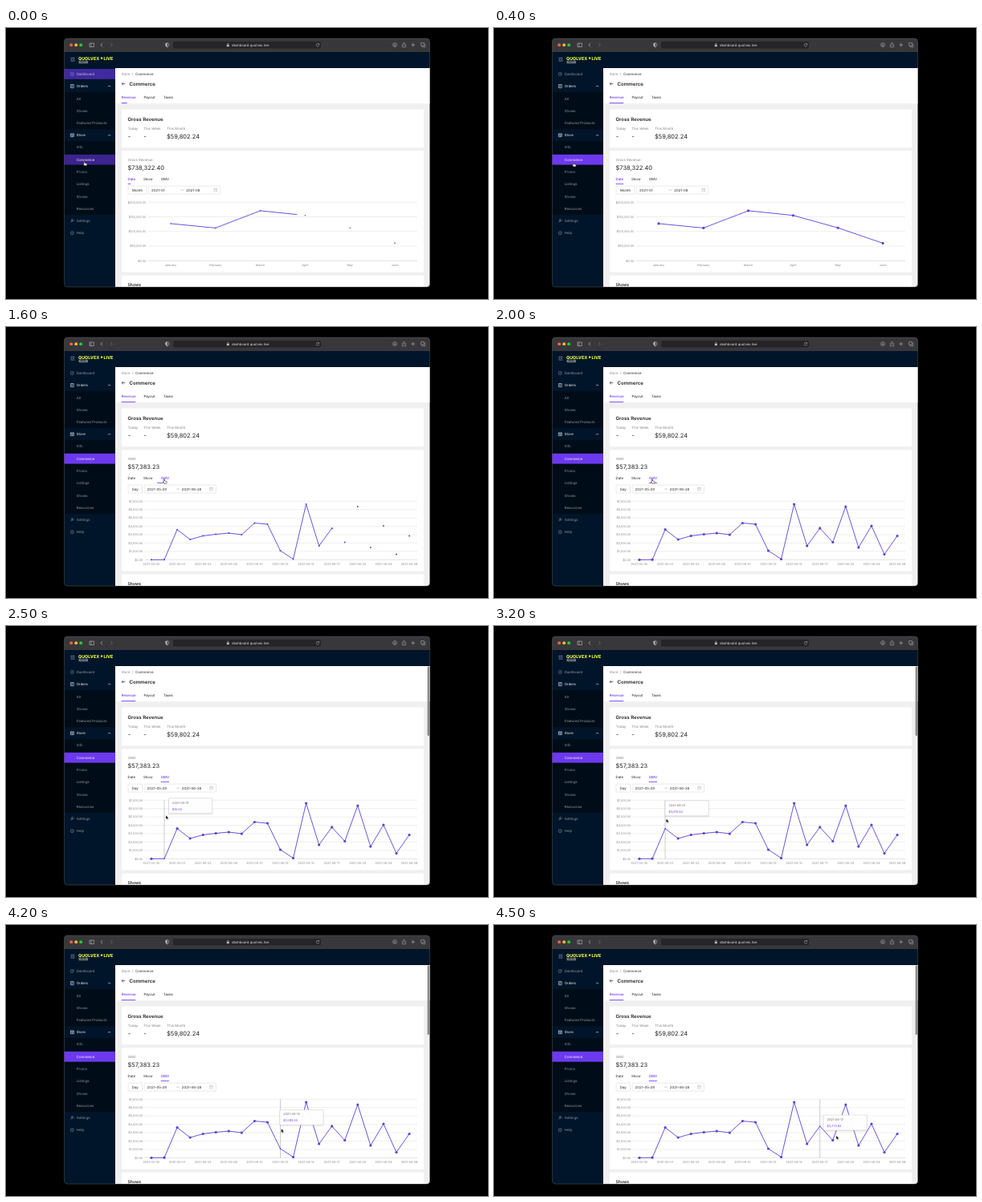
Write an HTML page that moves like this. It is 600 px wide and 338 px high and loops after 4.6 s.

```html
<!DOCTYPE html>
<html lang="en">
<head>
<meta charset="utf-8">
<title>Commerce dashboard</title>
<style>
html, body { margin: 0; width: 100%; height: 100%; overflow: hidden; background: #000; }
svg { display: block; width: 600px; height: 338px; font-family: Inter, Roboto, sans-serif; text-rendering: geometricPrecision; }
</style>
</head>
<body>
<svg viewBox="0 0 600 338">
  <defs>
    <clipPath id="window"><rect x="72.5" y="13" width="455" height="310" rx="4"/></clipPath>
    <clipPath id="plot"><rect x="140" y="200" width="372.5" height="100"/></clipPath>
  </defs>
  <g clip-path="url(#window)"><g id="page"></g><g id="live"></g></g>
  <rect x="72.5" y="13" width="455" height="310" rx="4" fill="none" stroke="#777" stroke-opacity=".6" stroke-width=".6"/>
  <g id="pointer"></g>
</svg>
<script>
const LOOP = 4600, STEP = 100, CLICK = 1400;
const PURPLE = '#6c39ee', LINE = '#5a41d6', INK = '#222', GRAY = '#858585', DIM = '#8f98a1';
const TOP = 217.3, BASE = 290.3;
const $ = id => document.getElementById(id);

const text = (x, y, str, size = 4.35, fill = INK, weight = 400, anchor = 'start') =>
  `<text x="${x}" y="${y + size * .36}" font-size="${size}" fill="${fill}" font-weight="${weight}" text-anchor="${anchor}">${str}</text>`;
const box = (x, y, w, h, fill, extra = '') =>
  `<rect x="${x}" y="${y}" width="${w}" height="${h}" fill="${fill}" ${extra}/>`;
const stroke = (d, color, width = .6, extra = '') =>
  `<path d="${d}" fill="none" stroke="${color}" stroke-width="${width}" ${extra}/>`;
const dot = (x, y, r, fill, extra = '') => `<circle cx="${x}" cy="${y}" r="${r}" fill="${fill}" ${extra}/>`;
const ring = (x, y, r, color) => dot(x, y, r, 'none', `stroke="${color}" stroke-width=".55"`);

const ramp = (t, from, length) => Math.min(1, Math.max(0, (t - from) / length));
const easeOut = p => 1 - (1 - p) ** 2;
const mix = (a, b, p) => a + (b - a) * p;
const money = (v, digits = 2) => '$' + v.toLocaleString('en-US', { minimumFractionDigits: digits, maximumFractionDigits: digits });

// Position on a path of [time, x, y] keys
function along(keys, t) {
  const i = keys.findIndex(k => k[0] > t);
  if (i < 0) return keys.at(-1).slice(1);
  if (i === 0) return keys[0].slice(1);
  const a = keys[i - 1], b = keys[i], p = ramp(t, a[0], b[0] - a[0]);
  return [mix(a[1], b[1], p), mix(a[2], b[2], p)];
}

const cursorPath = [
  [0, 97, 166], [600, 99, 168], [800, 112, 178], [1000, 143.5, 179], [1200, 151, 181],
  [1400, 196.3, 189.5], [2000, 196.3, 189.5], [2100, 188, 222], [2200, 188, 222],
  [2500, 199, 236], [2900, 199, 236], [3200, 214.3, 240.3], [3500, 267, 245], [3700, 267, 245],
  [3900, 290, 247.5], [4300, 360, 256], [4500, 426, 262.5]];
const tipPath = [
  [2100, 188, 203], [2200, 188, 203], [2500, 202.5, 214.8], [2900, 202.5, 214.8], [3200, 213, 217.8],
  [3500, 269, 222], [3700, 269, 222], [3900, 292, 225.6], [4300, 357, 232], [4500, 410, 237]];

const monthly = {
  title: 'Gross Revenue', total: '$738,322.40', unit: 'Month', unitW: 23, range: ['2021-01', '2021-06'],
  gridX: 177, x0: 205, dx: 55.8, max: 200000, tick: 50000, every: 1,
  names: ['January', 'February', 'March', 'April', 'May', 'June'],
  values: [127000, 112000, 171000, 155000, 112500, 60000]
};
const daily = {
  title: 'GMV', total: '$57,383.23', unit: 'Day', unitW: 17.5, range: ['2021-05-29', '2021-06-28'],
  gridX: 173, x0: 181, dx: 16.05, max: 7000, tick: 1000, every: 2,
  names: ('05-30 05-31 06-01 06-02 06-03 06-04 06-08 06-09 06-10 06-11 06-12 06-14 06-15 06-16 06-17 ' +
    '06-21 06-22 06-23 06-24 06-25 06-28').split(' ').map(d => '2021-' + d),
  values: [0, 10, 3613.92, 2425, 2857, 3050, 3190, 2998.76, 4390, 4247, 1083, 77, 6645, 1659,
    3773.82, 2090, 6357, 1467, 4056, 652, 2857]
};

function browserBar() {
  const c = '#b9b9bb';
  return box(72, 13, 456, 17, '#38383b') +
    ['#ff5f57', '#febc2e', '#28c840'].map((f, i) => dot(81.2 + i * 6, 21.2, 1.9, f)).join('') +
    stroke('M104 19h5.5v4.5h-5.5zM106 19v4.5', c) +
    stroke('M120 19l-2 2.2 2 2.2', c, .7) + stroke('M130.3 19l2 2.2-2 2.2', '#77777a', .7) +
    stroke('M200.7 18.6l2 .7v2q0 1.7-2 2.6-2-.9-2-2.6v-2z', c) +
    `<path d="M200.7 18.6v5.3q-2-.9-2-2.6v-2z" fill="${c}"/>` +
    box(208, 17, 184, 8.6, '#252527', 'rx="1.8"') +
    box(274.8, 20.8, 3, 2.4, c) + stroke('M275.4 21v-1q0-1 .9-1t.9 1v1', c, .5) +
    text(281, 21.2, 'dashboard.quolvex.live', 4.25, '#e4e4e6') +
    stroke('M389.5 20.2a1.8 1.8 0 1 0 .3 1.5M389.8 18.8v1.6h-1.6', c, .5) +
    ring(484, 21, 2.4, c) + stroke('M484 19.6v2.6M483 21.3l1 1 1-1', c, .5) +
    stroke('M494.2 20.2h-.9v3.6h4.2v-3.6h-.9M495.4 22.2v-4M494.3 19.2l1.1-1.1 1.1 1.1', c, .5) +
    stroke('M506.7 18.7v4.8M504.3 21.1h4.8', c, .6) +
    stroke('M516.5 18.5h3.7v3.7h-3.7zM518 22.2v1.5h3.7V20h-1.5', c, .5);
}

function sidebar() {
  const items = [[88, 'All'], [103.2, 'Shows'], [118.4, 'Featured Products'], [148.9, 'Info'],
    [194.7, 'Listings'], [210, 'Shows'], [225.2, 'Resources'], [240.4, 'Settings'], [255.7, 'Help']];
  return box(72, 30, 456, 20, '#001529') + box(72, 50, 64, 273, '#001529') +
    box(72, 80.2, 64, 46, '#000c17') + box(72, 141.3, 64, 91.5, '#000c17') +
    stroke('M80.5 37.3h5M82.5 39.2h3M80.5 41.1h5M80.6 38.2l1.2 1-1.2 1', '#b4bcc4', .55) +
    text(90, 37.6, 'QUOLVEX', 5.35, '#eaf63c', 800) + box(118, 36.5, 2.2, 2.2, '#eaf63c') +
    text(121.4, 37.6, 'LIVE', 5.35, '#eaf63c', 800) +
    box(90.5, 40.7, 11.5, 3.5, '#70767c', 'rx=".5"') + text(96.2, 42.5, 'BETA', 2.6, '#16222e', 600, 'middle') +
    items.map(([y, s]) => text(87.8, y, s, 4.35, DIM)).join('') +
    text(87.8, 72.6, 'Orders', 4.35, '#fff') + text(87.8, 133.7, 'Store', 4.35, '#fff') +
    stroke('M127.3 73.2l1.3-1.3 1.3 1.3M127.3 134.3l1.3-1.3 1.3 1.3', '#fff', .7) +
    stroke('M80.6 70.5h3.6v4.2h-3.6zM81.4 72h2M81.4 73.3h1.2', '#e4e7ea', .6) +
    stroke('M80.4 131.8h4v3.8h-4zM80.4 133.2h4M82.4 133.2v2.4', '#e4e7ea', .6) +
    stroke('M80.4 242.2l2.2-2.2M84.3 239.4a1.3 1.3 0 1 1-1.2-1.1', DIM, .7) +
    ring(82.3, 255.7, 2, DIM) + text(82.3, 255.7, '?', 3, DIM, 400, 'middle');
}

function content() {
  return box(136, 50, 392, 274, '#f0f0f1') + box(136, 50, 392, 44.2, '#fff') +
    [[101.5, 47.7], [153.2, 151.3], [308.5, 30]].map(([y, h]) => box(144, y, 376, h, '#fff', 'rx="1"')).join('') +
    text(143.7, 57.3, 'Store', 4.35, GRAY) + text(156.7, 57.3, '/', 4.35, GRAY) + text(161, 57.3, 'Commerce') +
    stroke('M148.4 69.6h-4.2M146 67.7l-1.9 1.9 1.9 1.9', INK, .65) +
    text(153.5, 69.6, 'Commerce', 6.15, INK, 600) +
    text(143.7, 86.6, 'Revenue', 4.35, PURPLE, 500) + text(171.4, 86.6, 'Payout') + text(195.9, 86.6, 'Taxes') +
    text(151.5, 114, 'Gross Revenue', 6.05, INK, 600) +
    text(151.7, 125, 'Today', 4.35, GRAY) + text(171.2, 125, 'This Week', 4.35, GRAY) + text(200.3, 125, 'This Month', 4.35, GRAY) +
    text(151.7, 135.6, '-', 7.5) + text(171.2, 135.6, '-', 7.5) + text(200, 135.6, '$59,802.24', 7.5) +
    text(171, 188, 'Show') + text(151.5, 319.8, 'Shows', 5.1, INK, 600);
}

function menuState(t) {
  const swap = mix(.55, 1, ramp(t, 0, 300));
  const bar = (y, alpha) => box(72, y - 6.4, 64, 12.8, PURPLE, `opacity="${alpha}"`);
  const hover = ramp(t, 600, 100) * (1 - ramp(t, 1000, 300));
  return bar(57.4, t < 300 ? 1.15 - swap : 0) + bar(164.2, swap) +
    ring(82.3, 57.4, 2, DIM) + stroke('M82.3 58l1-1.3', DIM, .6) +
    text(87.8, 57.4, 'Dashboard', 4.35, t < 200 ? '#c3c8d6' : DIM) +
    text(87.8, 164.2, 'Commerce', 4.35, '#fff') +
    text(87.8, 179.4, 'Promo', 4.35, DIM) +
    `<g opacity="${hover}">${text(87.8, 179.4, 'Promo', 4.35, '#fff')}</g>`;
}

function tabState(t) {
  const grow = mix(.4, 1, easeOut(ramp(t, 0, 300)));
  const slide = easeOut(ramp(t, CLICK, 300));
  const on = t >= CLICK;
  return box(143.7, 93.2, 17.6 * grow, .9, PURPLE) +
    box(mix(151.5, 192.7, slide), 194, mix(9.8, 10.4, slide) * grow, .8, PURPLE) +
    text(151.5, 188, 'Date', 4.35, on ? INK : PURPLE, on ? 400 : 500) +
    text(192.8, 188, 'GMV', 4.35, on ? PURPLE : INK, on ? 500 : 400);
}

function picker(set) {
  const frame = 'rx=".6" stroke="#d4d4d4" stroke-width=".5"';
  const x = 152 + set.unitW + 2.6, mid = x + 41.5;
  return box(152, 197.1, set.unitW, 10, '#fff', frame) + text(152 + set.unitW / 2, 202.2, set.unit, 4.35, INK, 400, 'middle') +
    box(x, 197.1, 89.4, 10, '#fff', frame) +
    text(x + 3.5, 202.2, set.range[0]) + text(x + 46.7, 202.2, set.range[1]) +
    stroke(`M${mid - 1.8} 202.2h3.6M${mid + .7} 201.2l1.1 1`, '#aaa', .5) +
    stroke(`M${x + 81.5} 200.4h3.7v3.6h-3.7zM${x + 81.5} 201.7h3.7M${x + 82.5} 199.8v1M${x + 84.2} 199.8v1`, '#b5b5b5', .5);
}

function chart(set, reveal, grow, active) {
  const px = i => set.x0 + i * set.dx, py = v => BASE - v / set.max * (BASE - TOP);
  let out = '';
  for (let v = 0; v <= set.max; v += set.tick)
    out += stroke(`M${set.gridX} ${py(v)}H512`, v ? '#dedede' : '#c2c2c2', .5) +
      text(set.gridX - 2.6, py(v), money(v), 3.7, GRAY, 400, 'end');
  set.names.forEach((name, i) => {
    if (i % set.every === 0) out += text(px(i), 295.4, name, 3.7, GRAY, 400, 'middle');
  });
  if (active >= 0) out += stroke(`M${px(active)} ${TOP}V${BASE}`, '#a9a9a9', .6);

  // The visible part of the line ends where the reveal edge cuts it
  const edge = mix(172, 512, reveal);
  let d = '';
  set.values.forEach((v, i) => {
    if (px(i) <= edge) d += `${i ? 'L' : 'M'}${px(i)} ${py(v)}`;
    else if (i && px(i - 1) < edge) d += `L${edge} ${mix(py(set.values[i - 1]), py(v), (edge - px(i - 1)) / set.dx)}`;
  });
  if (d) out += stroke(d, LINE, .9, 'stroke-linejoin="round"');
  set.values.forEach((v, i) => out += dot(px(i), py(v), i === active ? .8 : 1.6 * grow, LINE));
  return `<g clip-path="url(#plot)">${out}</g>`;
}

function tooltip([x, y], i) {
  return box(x - .6, y, 55.4, 20.4, '#000', 'opacity=".09" rx="1.2"') +
    box(x, y, 54.3, 19, '#fff', 'opacity=".96" rx="1" stroke="#c9c9c9" stroke-width=".5"') +
    text(x + 4.6, y + 5.6, daily.names[i], 3.75, '#666') +
    text(x + 4.6, y + 13.4, money(daily.values[i]), 3.75, PURPLE);
}

function cursor(t) {
  const [x, y] = along(cursorPath, t);
  const hand = t < 900 || (t >= CLICK && t < 2100);
  const shape = hand
    ? '<path d="M.1.7Q.7-.2 1.2.7V2.5L3.4 3Q4 3.2 3.9 3.9L3.4 5.7H.7L-.9 3.6Q-.8 2.8 .1 3.2Z" fill="#fff" stroke="#111" stroke-width=".55"/>'
    : '<path d="M0 0V5L1.2 4 2 5.8 2.9 5.4 2.1 3.7H3.6Z" fill="#000" stroke="#fff" stroke-width=".4"/>';
  return `<g transform="translate(${x} ${y})">${shape}</g>`;
}

function draw(t) {
  const set = t < CLICK ? monthly : daily;
  const reveal = t < CLICK ? mix(.56, 1, easeOut(ramp(t, 0, 400))) : easeOut(ramp(t, CLICK, 450));
  const grow = t < CLICK ? mix(.5, 1, ramp(t, 0, 400)) : mix(.3, 1, ramp(t, CLICK, 450));
  const tip = along(tipPath, t);
  const active = t >= 2100 ? Math.round((tip[0] - daily.x0) / daily.dx) : -1;
  $('live').innerHTML = menuState(t) + tabState(t) +
    text(151.7, 164.1, set.title, 4.35, GRAY) + text(151.5, 174.7, set.total, 7.5) +
    picker(set) + chart(set, reveal, grow, active) +
    (active >= 0 ? tooltip(tip, active) + box(524.6, 50.6, 2.3, 86.5, '#858585', 'rx="1.1"') : '');
  $('pointer').innerHTML = cursor(t);
}

$('page').innerHTML = content() + sidebar() + browserBar();
const start = performance.now();
function tick() {
  const t = (performance.now() - start) % LOOP;
  draw(Math.floor(t / STEP) * STEP);
  requestAnimationFrame(tick);
}
tick();
</script>
</body>
</html>
```
